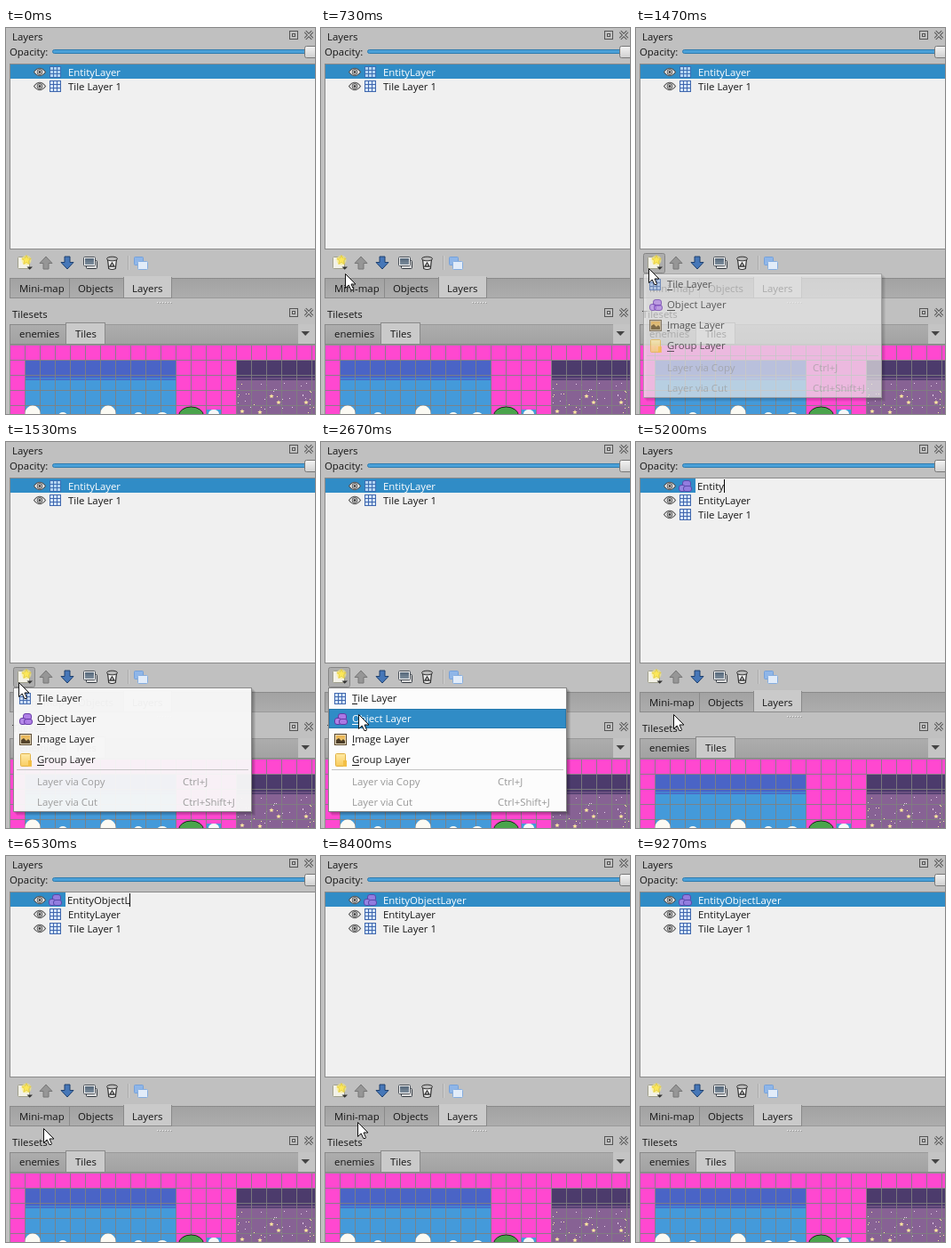
Animation of 348 by 434 pixels, one loop 9540 ms. Source, as an HTML page with a canvas:

```html
<!DOCTYPE html>
<html lang="en">
<head>
<meta charset="utf-8">
<title>Adding an object layer</title>
<style>
html, body { margin: 0; width: 100%; height: 100%; overflow: hidden; background: #c0c0c0; }
canvas { display: block; }
</style>
</head>
<body>
<canvas id="stage" width="348" height="434"></canvas>
<script>
const c = document.getElementById('stage').getContext('2d');
const LOOP = 9540, STEP = 1000 / 15;
const BLUE = '#308cc6', INK = '#151515', BASE = '#f0f0f0', EDGE = '#8a8a8a';
const NAME = 'EntityObjectLayer';
const KEYS = [4330, 4470, 4730, 4800, 5000, 5200, 5470, 5670, 5800,
  5930, 6130, 6270, 6530, 6730, 6870, 7070, 7130];

const clamp = v => Math.max(0, Math.min(1, v));
const between = (t, a, b) => t >= a && t < b;

function rect(x, y, w, h, fill) {
  c.fillStyle = fill;
  c.fillRect(x, y, w, h);
}
function frame(x, y, w, h, color) {
  c.strokeStyle = color;
  c.lineWidth = 1;
  c.strokeRect(x + .5, y + .5, w - 1, h - 1);
}
function shape(path, fill, stroke, width = 1) {
  const p = new Path2D(path);
  if (fill) { c.fillStyle = fill; c.fill(p); }
  if (stroke) { c.strokeStyle = stroke; c.lineWidth = width; c.stroke(p); }
}
function oval(x, y, rx, ry, fill, stroke) {
  c.beginPath();
  c.ellipse(x, y, rx, ry, 0, 0, 7);
  c.fillStyle = fill;
  c.fill();
  if (stroke) { c.strokeStyle = stroke; c.lineWidth = 1; c.stroke(); }
}
function rounded(x, y, w, h, r, fill, stroke) {
  c.beginPath();
  c.roundRect(x + .5, y + .5, w - 1, h - 1, r);
  c.fillStyle = fill;
  c.fill();
  c.strokeStyle = stroke;
  c.lineWidth = 1;
  c.stroke();
}
function shade(y, h, top, bottom) {
  const g = c.createLinearGradient(0, y, 0, y + h);
  g.addColorStop(0, top);
  g.addColorStop(1, bottom);
  return g;
}
function at(x, y, draw) {
  c.save();
  c.translate(x, y);
  draw();
  c.restore();
}
function label(s, x, y, color = INK) {
  c.fillStyle = color;
  c.fillText(s, x, y);
}
function star(x, y, r, fill, stroke) {
  c.beginPath();
  for (let i = 0; i < 10; i++) {
    const a = i * Math.PI / 5 - Math.PI / 2, d = i % 2 ? r * .45 : r;
    c.lineTo(x + d * Math.cos(a), y + d * Math.sin(a));
  }
  c.closePath();
  c.fillStyle = fill;
  c.fill();
  if (stroke) { c.strokeStyle = stroke; c.lineWidth = .6; c.stroke(); }
}

// Icons, each drawn from its top left corner
const icons = {
  eye() {
    shape('M.5 5.5Q7-3 13.5 5.5Q7 14 .5 5.5Z', '#f6f6f6', '#555', 1.2);
    oval(7, 5.5, 3, 3, '#c8c8c8', '#555');
    oval(7, 5.5, 1.3, 1.3, '#333');
  },
  grid() {
    rect(0, 0, 13, 13, '#3e66ad');
    for (let i = 0; i < 9; i++) rect(1 + i % 3 * 4, 1 + (i / 3 | 0) * 4, 3, 3, '#d3e4fa');
  },
  object() {
    rounded(4, 0, 10, 8, 2.5, '#ab78e4', '#6438a4');
    rounded(0, 5, 8, 8, 2.5, '#b183e8', '#6438a4');
    rounded(5, 6, 10, 7, 2.5, '#ab78e4', '#6438a4');
  },
  image() {
    rect(0, 0, 14, 13, '#59472c');
    rect(1, 1, 12, 11, '#e8dcc0');
    rect(2, 2, 10, 9, shade(2, 9, '#e9b04c', '#f3d98c'));
    shape('M2 11V7L5 5L8 8L10 6L12 8V11Z', '#4b3c26');
  },
  group() {
    rounded(1, -1, 12, 15, 1, shade(0, 14, '#ffe9a2', '#f8c956'), '#e0b040');
    rect(10, 7, 4, 7, '#f3bf45');
  },
  create() {
    rounded(0, 2, 14, 14, 1, '#f3f2e8', '#a0a08c');
    oval(10, 6, 5.5, 5.5, 'rgba(255,240,120,.6)');
    star(10, 6, 5.5, '#fbe75a', '#d9bf30');
    shape('M10.5 13.5H17L13.7 16.8Z', '#333');
  },
  up() { shape('M8 1L15 8.5H11V15H5V8.5H1Z', '#969696', '#777'); },
  down() { shape('M8 15L15 7.5H11V1H5V7.5H1Z', '#4677b8', '#1f416f'); },
  copy() {
    rounded(3, 5, 13, 10, 1, '#dcdcdc', '#353b42');
    rounded(0, 1, 14, 11, 1, '#f6f6f6', '#4a5058');
    rect(2, 3, 10, 7, shade(3, 7, '#55677a', '#7d8d9c'));
  },
  trash() {
    shape('M2.5 4L3.7 14.5Q7.5 16.5 11.3 14.5L12.5 4Z', '#ececec', '#333', 1.2);
    oval(7.5, 3.5, 6, 2.3, '#bdbdbd', '#2c2c2c');
    shape('M7.5 8L10 12H5Z', null, '#333', 1.3);
  },
  stack() {
    rounded(0, 0, 11, 10, 1, '#8fb6e8', '#74a0da');
    rounded(4, 5, 12, 10, 1, '#e2ecf9', '#86aee0');
  }
};
const icon = (name, x, y) => at(x, y, icons[name]);

function dockTitle(title, y) {
  label(title, 7, y + 14);
  frame(319, y + 3, 10, 10, '#555');
  frame(322, y + 6, 4, 4, '#555');
  at(337, y + 4, () => {
    shape('M0 0L8 8M8 0L0 8', null, '#555', 3.2);
    shape('M0 0L8 8M8 0L0 8', null, '#c8c8c8', 1.2);
  });
}

function tab(s, x, y, w, h, textX, baseline, active) {
  if (active) rect(x, y, w, h, '#cacaca');
  frame(x, y, w, h, EDGE);
  label(s, textX, baseline);
}

function row(i, name, kind, selected) {
  const y = 41 + 16 * i;
  if (selected) rect(5, y, 343, 16, BLUE);
  icon('eye', 31, y + 3);
  icon(kind, kind === 'object' ? 48 : 49, y + 2);
  if (selected) {
    c.globalAlpha = .2;
    rect(48, y + 1, 15, 14, BLUE);
    c.globalAlpha = 1;
  }
  label(name, 70, y + 13, selected ? '#fff' : INK);
}

function editor(t) {
  rect(67, 41, 281, 16, BASE);
  const typed = KEYS.filter(k => t >= k).length;
  const value = typed ? NAME.slice(0, typed) : 'Object Layer 1';
  const width = Math.round(c.measureText(value).width);
  if (!typed) rect(69, 42, width, 15, BLUE);
  label(value, 69, 54, typed ? INK : '#fff');
  if (!between(t, 3665, 4195)) rect(69 + width, 42, 1, 15, '#000');
}

function layerList(t) {
  rect(4, 40, 344, 209, BASE);
  rect(4, 40, 344, 1, EDGE);
  rect(4, 248, 344, 1, EDGE);
  rect(4, 40, 1, 209, EDGE);
  const added = t >= 3130;
  if (added) row(0, NAME, 'object', true);
  row(+added, 'EntityLayer', 'grid', !added);
  row(1 + added, 'Tile Layer 1', 'grid', false);
  if (between(t, 3130, 7330)) editor(t);
}

function toolbar(button) {
  if (button) rounded(8, 253, 25, 23, 2, button === 'down' ? '#adadad' : '#cccccc', '#858585');
  icon('create', 13, 255);
  icon('up', 37, 256);
  icon('down', 61, 256);
  icon('copy', 87, 256);
  icon('trash', 112, 256);
  rect(137, 256, 1, 16, '#aaa');
  rect(138, 256, 1, 16, '#d0d0d0');
  icon('stack', 144, 257);
}

function sky(x, w, top, middle, low) {
  rect(x, 374, w, 60, low);
  rect(x, 374, w, 19, top);
  rect(x, 393, w, 2, middle);
  rect(x, 395, w, 1, top);
}

function tiles() {
  c.save();
  c.beginPath();
  c.rect(5, 357, 343, 77);
  c.clip();
  rect(5, 357, 343, 77, '#ff48d0');
  sky(22, 170, '#4a64c6', '#4680d0', '#449ada');
  sky(260, 88, '#4c3b6c', '#6a4f80', '#876294');

  let seed = 11;
  const random = () => (seed = seed * 16807 % 2147483647) / 2147483647;
  for (let i = 0; i < 42; i++) {
    rect(261 + (random() * 86 | 0), 399 + (random() * 34 | 0), 1, 1, i % 3 ? '#e6cfe8' : '#fff2a0');
  }
  for (const [x, y] of [[299, 414], [266, 431], [286, 432], [307, 421], [338, 421]]) {
    star(x, y, 2.8, '#ffe9a0');
  }
  c.globalAlpha = .88;
  for (let x = 21; x < 348; x += 17) rect(x, 357, 1, 77, '#808080');
  for (let y = 373; y < 434; y += 17) rect(5, y, 343, 1, '#808080');
  c.globalAlpha = 1;

  for (const x of [30, 115]) {
    oval(x, 433, 8.5, 8.5, '#fbfaf3');
    oval(x + 34, 436, 5, 4, '#fbfaf3');
  }
  oval(176, 436, 6, 4, '#fbfaf3');
  oval(208.5, 436, 14, 10, '#4aa44c', '#172a18');
  rect(226, 429, 16, 5, '#449ada');
  oval(234, 434, 6, 5, '#f7f7f7');
  c.restore();
}

function panels() {
  dockTitle('Layers', 0);
  label('Opacity:', 4, 31);
  rounded(52, 24, 300, 5, 2, '#4aa0d8', '#2f7caf');
  rounded(336, 20, 15, 14, 2, shade(20, 14, '#f4f4f4', '#cfcfcf'), '#777');

  rect(4, 281, 344, 23, shade(281, 23, '#a2a2a2', '#adadad'));
  rect(4, 281, 344, 1, EDGE);
  rect(4, 303, 344, 1, '#9a9a9a');
  tab('Mini-map', 4, 281, 68, 23, 15, 297);
  tab('Objects', 71, 281, 62, 23, 81, 297);
  tab('Layers', 132, 280, 55, 24, 142, 297, true);
  rect(133, 279, 53, 2, '#cacaca');
  for (let x = 170; x < 188; x += 3) {
    rect(x, 308, 1, 1, '#eee');
    rect(x + 1, 309, 1, 1, '#999');
  }

  dockTitle('Tilesets', 312);
  rect(4, 333, 325, 23, shade(333, 23, '#adadad', '#a2a2a2'));
  rect(4, 333, 325, 1, '#9a9a9a');
  tab('enemies', 4, 333, 64, 23, 15, 348);
  tab('Tiles', 67, 331, 45, 25, 78, 348, true);
  rect(112, 355, 236, 1, EDGE);
  rect(329, 333, 19, 22, '#c4c4c4');
  shape('M332.5 341H342L337.2 346Z', '#444');
  rect(4, 356, 344, 78, '#8f8f8f');
  tiles();
}

function menu(alpha, hovered) {
  c.globalAlpha = alpha;
  for (let i = 1; i < 5; i++) rect(8 + i, 276 + i, 269, 140, 'rgba(0,0,0,.08)');
  rect(8, 276, 269, 140, '#fcfcfc');
  frame(8, 276, 269, 140, '#858585');
  ['Tile Layer', 'Object Layer', 'Image Layer', 'Group Layer'].forEach((s, i) => {
    const y = 277 + 23 * i, color = i === hovered ? '#fff' : INK;
    if (i === hovered) {
      rect(9, y, 267, 22, BLUE);
      frame(9, y, 267, 22, '#2678ac');
    }
    icon(['grid', 'object', 'image', 'group'][i], 15, y + 5);
    label(s, 35, y + 15, color);
    rect(35, y + 17, Math.round(c.measureText(s[0]).width), 1, color);
  });
  rect(12, 368, 261, 1, '#c4c4c4');
  [['Layer via Copy', 'Ctrl+J'], ['Layer via Cut', 'Ctrl+Shift+J']].forEach(([s, keys], i) => {
    label(s, 35, 386 + 23 * i, '#989898');
    label(keys, 199, 386 + 23 * i, '#989898');
  });
  c.globalAlpha = 1;
}

// Pointer tip, or null while it is off the stage
function pointerAt(t) {
  if (t < 130 || t >= 8725) return null;
  if (t < 2000) {
    const left = (1 - clamp((t - 133) / 933)) ** 3;
    return [14 + 280 * left, 270 + 128 * left];
  }
  if (t < 8395) {
    const u = clamp((t - 2000) / 667), e = u * u * (3 - 2 * u);
    return [14 + 28 * e, 270 + 36 * e];
  }
  const exit = [[41, 299], [38, 311], [32, 341], [25, 382], [17, 424]];
  return exit[Math.min(4, Math.floor((t - 8395) / STEP))];
}

function render(t) {
  const tip = pointerAt(t);
  const open = between(t, 1395, 3130);
  const over = tip && t < 3130 && tip[1] < 275 && tip[0] < 33;
  rect(0, 0, 348, 434, '#c0c0c0');
  c.font = '11.4px "Open Sans", "Noto Sans", sans-serif';
  panels();
  layerList(t);
  toolbar(open ? 'down' : over ? 'hover' : null);
  if (open) {
    const alpha = [.3, .65, .94, 1][Math.min(3, Math.floor((t - 1395) / STEP))];
    menu(alpha, tip[1] < 277 ? -1 : tip[1] < 300 ? 0 : 1);
  }
  if (tip) {
    at(Math.round(tip[0]) + .5, Math.round(tip[1]) + .5, () =>
      shape('M0 0V16L3.7 12.5L6.3 18H8.5L9 17L6.5 11.5H11.5Z', '#fff', '#111'));
  }
}

function tick() {
  const t = performance.now() % LOOP;
  render(Math.floor((t + 3.4) / STEP) * STEP + 1);
  requestAnimationFrame(tick);
}
tick();
</script>
</body>
</html>
```
